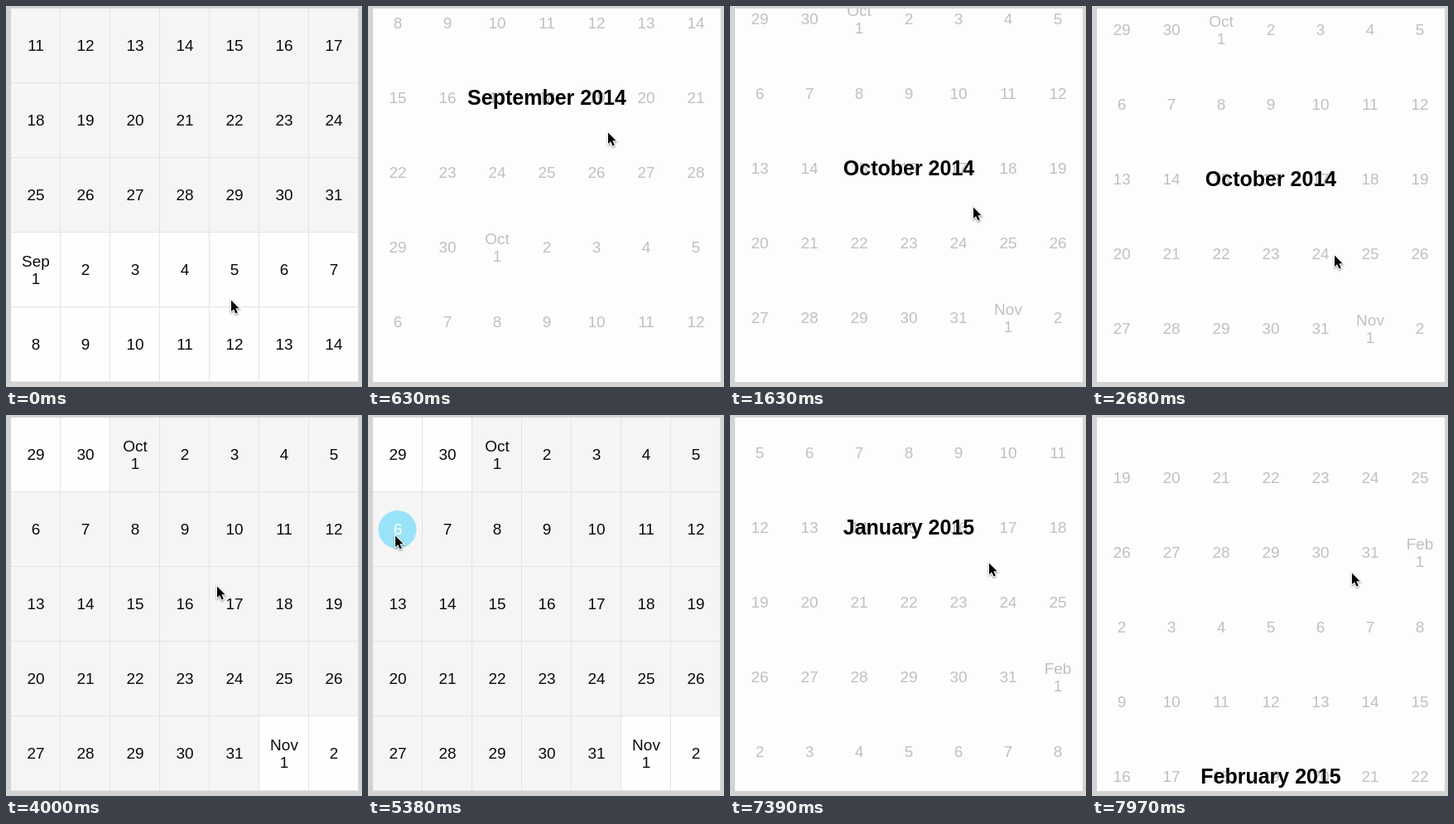
An HTML page with a canvas for the animation above (8000 ms loop, 430 px wide and 459 px high).

```html
<!DOCTYPE html>
<html lang="en">
<head>
<meta charset="utf-8">
<title>Scrolling calendar</title>
<style>
  html, body { margin: 0; width: 100%; height: 100%; overflow: hidden; background: #d3d3d3; }
  canvas { display: block; }
</style>
</head>
<body>
<canvas id="stage" width="430" height="459"></canvas>
<script>
const ctx = document.getElementById('stage').getContext('2d');
const LOOP = 8000, STEP = 57.22; // the screen refreshes once per step
const LEFT = 6, TOP = 3, COL = 60, ROW = 90, WIDTH = 420, HEIGHT = 450;
const FONT = '"Liberation Sans", Arial, sans-serif';
const MONTHS = ['January', 'February', 'March', 'April', 'May', 'June', 'July',
  'August', 'September', 'October', 'November', 'December'];

// Stops of the pointer tip: time, x, y
const STOPS = [
  [0, 271, 353], [402, 289, 151], [900, 289, 151], [1600, 293, 241], [2630, 292, 299],
  [3580, 254, 205], [3940, 254, 205], [4780, 16, 196], [5080, 32, 144], [5440, 32, 144],
  [5800, 334, 387], [6100, 344, 367], [6500, 311, 166], [6810, 311, 166], [LOOP, 313, 189]];

const ramp = (t, a, b) => Math.min(1, Math.max(0, (t - a) / (b - a)));
const mix = (a, b, k) => a + (b - a) * k;
const smooth = k => k * k * (3 - 2 * k);
const coast = (t, start, from, to) => to - (to - from) * Math.exp((start - t) / 500);

// Drag, coast, pull back and settle on a row; later a stronger flick
function scrollAt(t) {
  if (t < 402) return 201 * Math.pow(t / 402, 1.7);
  if (t < 2050) return coast(t, 630, 387, 708);
  if (t < 2630) return mix(689, 649, 1 - Math.pow(1 - ramp(t, 2050, 2630), 2));
  if (t < 6100) return mix(649, 630, smooth(ramp(t, 2630, 3000)));
  if (t < 6500) return mix(630, 827, Math.pow(ramp(t, 6100, 6500), 4));
  return coast(t, 6810, 1421, 2112);
}

function veilAt(t) {
  return ramp(t, 0, 300) - ramp(t, 2950, 3250) + ramp(t, 6100, 6400);
}

function pointerAt(t) {
  const i = STOPS.findIndex(stop => stop[0] > t);
  const [a, x0, y0] = STOPS[i - 1], [b, x1, y1] = STOPS[i];
  const k = smooth(ramp(t, a, b));
  return [Math.round(mix(x0, x1, k)), Math.round(mix(y0, y1, k))];
}

function drawCell(date, x, y, t, veil) {
  const day = date.getDate(), month = date.getMonth(), mid = x + 30, base = y + 51;
  ctx.globalAlpha = 1 - veil;
  ctx.fillStyle = '#e3e3e3';
  ctx.fillRect(x, y, COL, ROW);
  ctx.fillStyle = month % 2 ? '#f5f5f5' : '#fefefe';
  ctx.fillRect(x, y, COL - 1, ROW - 1);

  const picked = month === 9 && day === 6 ? ramp(t, 5140, 5380) : 0;
  ctx.globalAlpha = picked;
  ctx.fillStyle = '#99e3f8';
  ctx.beginPath();
  ctx.arc(mid - 0.5, y + 45, 23, 0, 7);
  ctx.fill();

  ctx.globalAlpha = mix(1, 0.25, veil);
  ctx.fillStyle = picked ? '#fff' : '#0c0c0c';
  if (day === 1) {
    ctx.fillText(MONTHS[month].slice(0, 3), mid, base - 10);
    ctx.fillText(day, mid, base + 11);
  } else {
    ctx.fillText(day, mid, base);
  }
}

function drawPointer(x, y) {
  ctx.save();
  ctx.translate(x, y);
  ctx.beginPath();
  [[1, 1.5], [1, 15], [4.1, 12.2], [6.6, 17.6], [8.8, 16.6], [6.4, 11.3], [10.6, 11.2]]
    .forEach(p => ctx.lineTo(...p));
  ctx.closePath();
  ctx.lineWidth = 2;
  ctx.strokeStyle = '#fff';
  ctx.shadowColor = 'rgba(0,0,0,.45)';
  ctx.shadowBlur = 2;
  ctx.shadowOffsetY = 1;
  ctx.stroke();
  ctx.shadowColor = 'transparent';
  ctx.fillStyle = '#000';
  ctx.fill();
  ctx.restore();
}

function draw(t) {
  const scroll = Math.round(scrollAt(t)), veil = veilAt(t);
  const first = Math.floor(scroll / ROW), titles = [];
  ctx.fillStyle = '#d3d3d3';
  ctx.fillRect(0, 0, 430, 459);
  ctx.save();
  ctx.beginPath();
  ctx.rect(LEFT, TOP, WIDTH, HEIGHT);
  ctx.clip();
  ctx.fillStyle = '#fdfdfd';
  ctx.fillRect(LEFT, TOP, WIDTH, HEIGHT);
  ctx.textAlign = 'center';
  ctx.font = '19px ' + FONT;
  for (let row = first - 1; row <= first + 6; row++) {
    const y = TOP + row * ROW - scroll;
    for (let col = 0; col < 7; col++) {
      const date = new Date(2014, 7, 11 + row * 7 + col);
      drawCell(date, LEFT + col * COL, y, t, veil);
      if (date.getDate() === 16) {
        titles.push([MONTHS[date.getMonth()] + ' ' + date.getFullYear(), y + 53]);
      }
    }
  }
  // Month titles appear while the days are faded
  ctx.globalAlpha = veil;
  ctx.fillStyle = '#000';
  ctx.font = 'bold 25px ' + FONT;
  for (const [text, y] of titles) ctx.fillText(text, LEFT + WIDTH / 2, y);
  ctx.restore();
  if (t < 5600 || t > 5840) drawPointer(...pointerAt(t));
}

const begin = performance.now();
function tick() {
  const t = (performance.now() - begin) % LOOP;
  draw(Math.floor(t / STEP) * STEP);
  requestAnimationFrame(tick);
}
tick();
</script>
</body>
</html>
```
